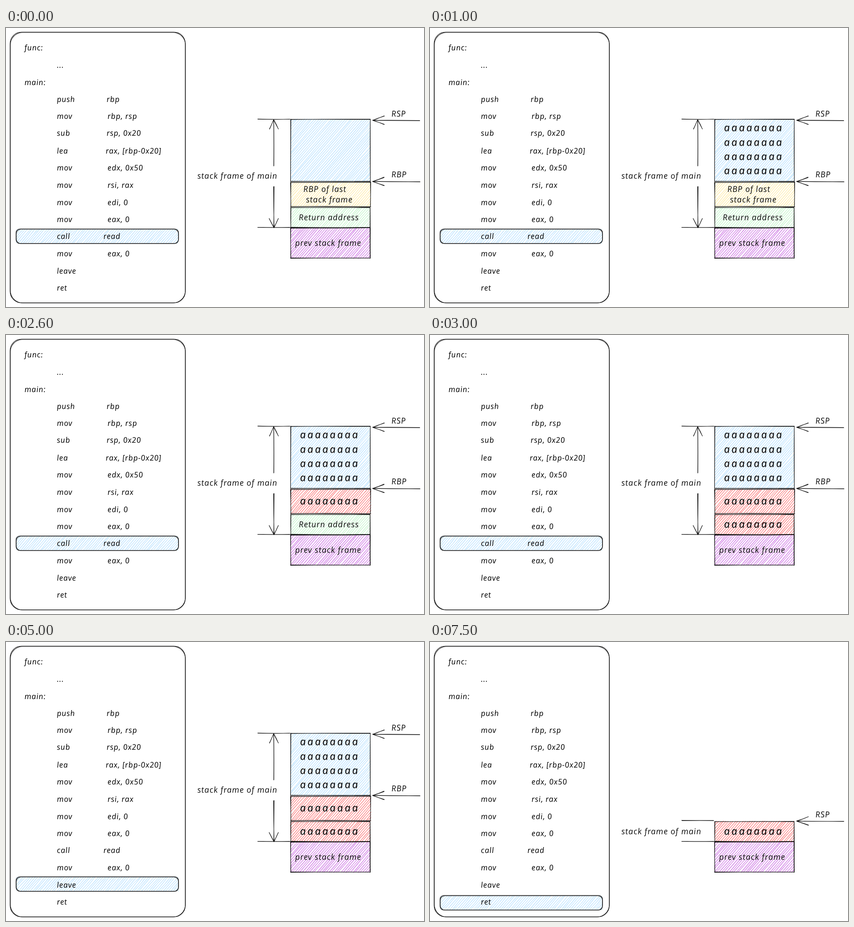
Recreate the animation shown at these times as an HTML page. Size 916 by 611 pixels, loop 8.5 s.

```html
<!DOCTYPE html>
<html lang="en">
<head>
<meta charset="utf-8">
<title>Stack overflow walkthrough</title>
<style>
html, body { margin: 0; width: 100%; height: 100%; overflow: hidden; background: #fff; }
svg { display: block; fill: none; stroke: #111; stroke-width: 1.1; stroke-linecap: round; stroke-linejoin: round; }
text { font: italic 18px "Open Sans", "Noto Sans", sans-serif; letter-spacing: .9px; fill: #111; stroke: none; white-space: pre; }
.code { font-size: 17px; letter-spacing: .8px; fill: #000; }
.fill { font-size: 22px; letter-spacing: 3.9px; stroke: #111; stroke-width: .3; }
.hatch { stroke-width: .75; }
</style>
</head>
<body>
<svg id="stage" width="916" height="611" viewBox="0 0 916 611"></svg>
<script>
const stage = document.getElementById("stage");
const BLUE = "#a5d8ff", YELLOW = "#ffe58a", GREEN = "#b2f2bb", RED = "#fa5252", PURPLE = "#be4bdb";
const SLOPE = Math.tan(49 * Math.PI / 180);

// [baseline, mnemonic, operand x, operands]
const code = [
  [162, "push", 221, "rbp"],
  [199, "mov", 223, "rbp, rsp"],
  [236, "sub", 221, "rsp, 0x20"],
  [275, "lea", 219, "rax, [rbp-0x20]"],
  [312, "mov", 223, "edx, 0x50"],
  [350, "mov", 223, "rsi, rax"],
  [388, "mov", 223, "edi, 0"],
  [425, "mov", 223, "eax, 0"],
  [462, "call", 214, "read"],
  [500, "mov", 223, "eax, 0"],
  [538, "leave", 0, ""],
  [575, "ret", 0, ""]
];

let seed = 1;
function jitter(size) {
  seed = seed * 16807 % 2147483647;
  return (seed / 2147483647 * 2 - 1) * size;
}

// The slight skew makes the italic letters stand almost upright.
const text = (x, y, words, kind = "") =>
  `<text class="${kind}" transform="translate(${x} ${y}) skewX(6)">${words}</text>`;

const path = (d, attrs = "") => `<path d="${d}" ${attrs}/>`;

function strokes(x1, y1, x2, y2, size = .6) {
  let d = "";
  for (let i = 0; i < 2; i++) {
    const near = `${x1 + jitter(size)} ${y1 + jitter(size)}`;
    const mid = `${(x1 + x2) / 2 + jitter(size)} ${(y1 + y2) / 2 + jitter(size)}`;
    d += `M${near}Q${mid} ${x2 + jitter(size)} ${y2 + jitter(size)}`;
  }
  return d;
}

const line = (...ends) => path(strokes(...ends));

function hatch(x, y, w, h, color) {
  seed = 1000 + x * 7 + y * 13;
  let d = "";
  for (let c = 4; c < h + SLOPE * w; c += 6.1) {
    const x1 = Math.max(0, (c - h) / SLOPE), x2 = Math.min(w, c / SLOPE);
    d += strokes(x + x1, y + c - x1 * SLOPE, x + x2, y + c - x2 * SLOPE, 1.3);
  }
  return path(d, `class="hatch" stroke="${color}"`);
}

function box(x, y, w, h, color) {
  const r = x + w, b = y + h;
  return hatch(x, y, w, h, color) +
    line(x, y, r, y) + line(r, y, r, b) + line(r, b, x, b) + line(x, b, x, y);
}

function rounded(x, y, w, h, r) {
  const rect = (dx, dy, dr) =>
    `<rect x="${x + dx}" y="${y + dy}" width="${w - dx}" height="${h - dy}" rx="${r + dr}"/>`;
  return rect(0, 0, 0) + rect(.6, .7, 2);
}

function pointer(name, y, labelY) {
  return line(907, y + 1, 804, y) + line(829, y - 9, 804, y) + line(829, y + 9, 804, y) +
    text(845, labelY, name);
}

function measure(tip, end) {
  const back = tip + Math.sign(end - tip) * 20;
  return line(587, tip, 587, end) + line(577, back, 587, tip) + line(597, back, 587, tip);
}

function listing(step) {
  const top = [440, 440, 440, 440, 481, 514, 555][step];
  let out = rounded(9, 9, 384, 593, 25) +
    hatch(23, top + 1, 354, 30, BLUE) + rounded(22, top, 356, 32, 8) +
    text(41, 49, "func:", "code") + text(112, 87, "...", "code") + text(41, 125, "main:", "code");
  for (const [y, name, x, args] of code)
    out += text(112, y, name, "code") + (args && text(x, y, args, "code"));
  return out;
}

function stack(step) {
  const filler = y => text(645, y, "aaaaaaaa", "fill");
  const left = step === 6;
  let out = box(624, 438, 174, 66, PURPLE) + text(634, 477, "prev stack frame") +
    box(624, 393, 174, 44, step > 2 ? RED : GREEN) +
    (step > 2 ? filler(422) : text(642, 421, "Return address")) +
    line(552, 437, 622, 437) + text(420, left ? 421 : 330, "stack frame of main");
  if (left) return out + line(552, 391, 622, 391) + pointer("RSP", 392, 384);

  out += box(624, 338, 175, 53, step > 1 ? RED : YELLOW) +
    (step > 1 ? filler(371) : text(652, 359, "RBP of last") + text(658, 382, "stack frame")) +
    box(624, 200, 174, 136, BLUE) +
    line(552, 200, 622, 200) + measure(201, 302) + measure(437, 347) +
    pointer("RSP", 202, 194) + pointer("RBP", 336, 327);
  if (step > 0) out += [226, 258, 289, 320].map(filler).join("");
  return out;
}

let shown = -1;
function tick(now) {
  const step = Math.min(6, Math.floor(now % 8500 / 1000));
  if (step !== shown) {
    shown = step;
    seed = 1;
    stage.innerHTML = listing(step) + stack(step);
  }
  requestAnimationFrame(tick);
}
tick(performance.now());
</script>
</body>
</html>
```
